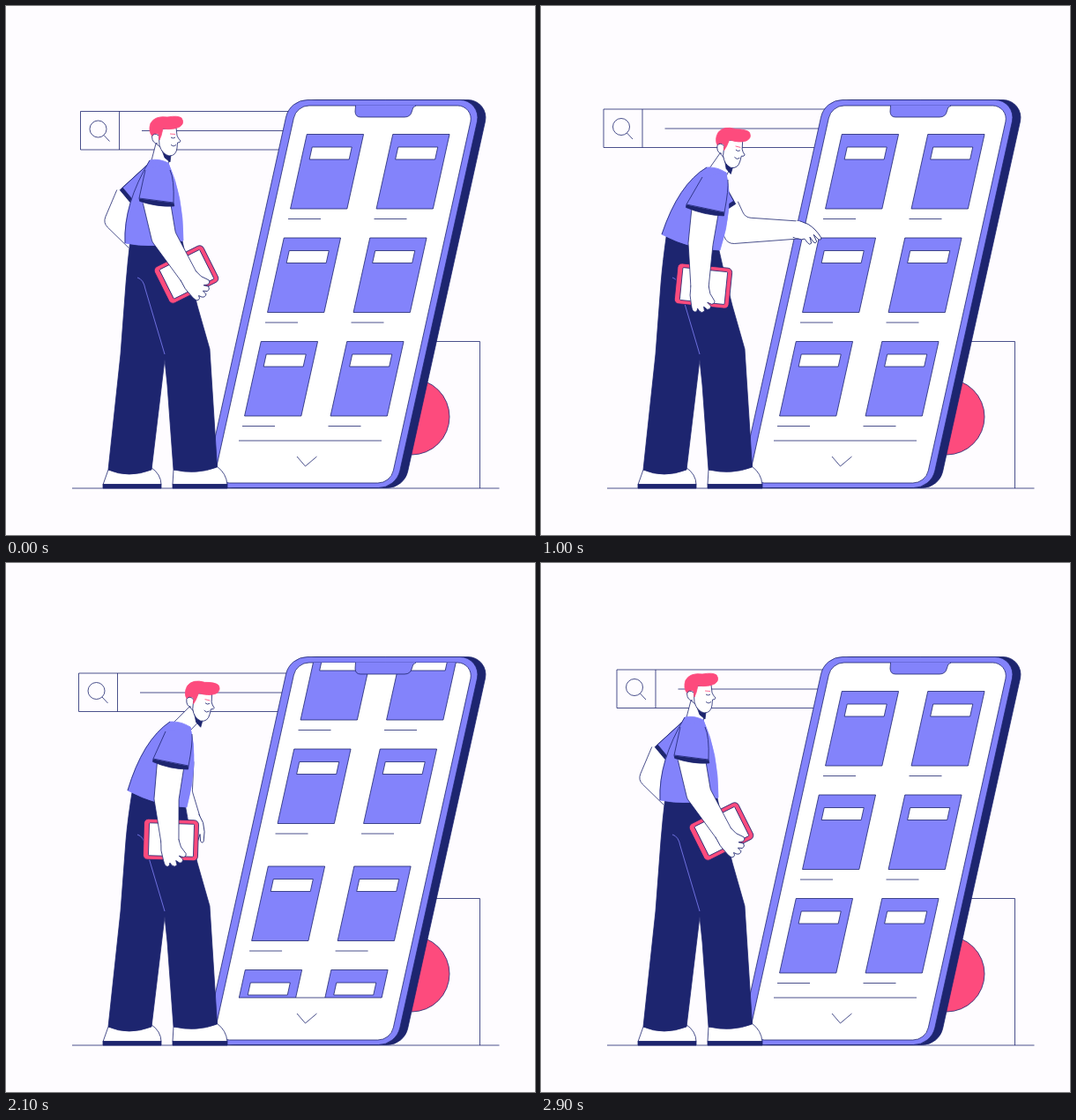
An HTML page with a canvas for the animation above (3 s loop, 600x600 px).

```html
<!DOCTYPE html>
<html lang="en">
<head>
<meta charset="utf-8">
<title>Scrolling a phone</title>
<style>
html, body { margin: 0; width: 100%; height: 100%; overflow: hidden; background: #fefcff; }
canvas { display: block; width: 600px; height: 600px; }
</style>
</head>
<body>
<canvas id="stage"></canvas>
<script>
const NAVY = '#1d256f', PURPLE = '#8383fb', PINK = '#fd4b7d', WHITE = '#fff', BACK = '#fefcff';
const LOOP = 3000, STEP = 100, SLOPE = 0.2213;
const SET_HEIGHT = 368, ROW_HEIGHT = 117.5;
const canvas = document.getElementById('stage');
const ctx = canvas.getContext('2d');
const ratio = window.devicePixelRatio || 1;
canvas.width = canvas.height = 600 * ratio;

// Poses: points as [x, y]; head and tablet also carry an angle.
const stand = {
  head: [169, 150, 0], neckBack: [163, 175], neckFront: [184, 178],
  chest: [201, 215], hemFront: [201, 266], spine: [133, 225], hemBack: [135, 269],
  cuffBack: [151, 218], cuffFront: [190, 223], elbow: [179, 262], wrist: [208, 308],
  tablet: [204.5, 304.5, -0.464],
  farCuff: [138, 213], farElbow: [127, 243], farWrist: [149, 270], farHand: [0.6]
};
const lean = {
  head: [203, 160, 0.17], neckBack: [186, 183], neckFront: [208, 189],
  chest: [213, 225], hemFront: [203, 278], spine: [156, 204], hemBack: [137, 261],
  cuffBack: [162, 226], cuffFront: [205, 234], elbow: [181, 270], wrist: [182, 319],
  tablet: [186, 316.5, 0],
  farCuff: [158, 211], farElbow: [140, 238], farWrist: [151, 262], farHand: [0.6]
};
const reach = {
  head: [203, 161, 0.17], neckBack: [188, 183], neckFront: [210, 189],
  chest: [219, 228], hemFront: [203, 277], spine: [156, 202], hemBack: [137, 259],
  cuffBack: [165, 225], cuffFront: [208, 234], elbow: [181, 270], wrist: [180, 320],
  tablet: [184, 317.5, 0.1],
  farCuff: [211, 226], farElbow: [221, 255], farWrist: [292, 254], farHand: [0.36]
};
const swipe = {
  head: [228, 169, 0.2], neckBack: [205, 185], neckFront: [228, 194],
  chest: [227, 242], hemFront: [206, 272], spine: [165, 193], hemBack: [140, 247],
  cuffBack: [176, 221], cuffFront: [215, 237], elbow: [182, 265], wrist: [171, 320],
  tablet: [173.5, 316, 0.28],
  farCuff: [221, 233], farElbow: [225, 264], farWrist: [281, 295], farHand: [0.08]
};
const rest = {
  head: [208, 157, 0.15], neckBack: [186, 180], neckFront: [209, 186],
  chest: [219, 225], hemFront: [205, 277], spine: [155, 201], hemBack: [138, 258],
  cuffBack: [167, 222], cuffFront: [207, 230], elbow: [182, 268], wrist: [186, 317],
  tablet: [187, 314, 0.03],
  farCuff: [200, 224], farElbow: [196, 262], farWrist: [211, 292], farHand: [1.1]
};
const mix = (a, b, u) => a + (b - a) * u;
const blend = (a, b, u) => Object.fromEntries(
  Object.keys(a).map(k => [k, a[k].map((v, i) => mix(v, b[k][i], u))]));

const poseKeys = [[0, stand], [400, lean], [1000, reach], [1200, reach], [1800, swipe],
  [2100, rest], [2500, blend(stand, rest, 0.09)], [2700, stand], [3000, stand]];
const scrollKeys = [[0, 0], [1200, 0], [1800, 72.5], [2100, 198.5], [2500, 331.5],
  [2800, SET_HEIGHT], [3000, SET_HEIGHT]];
const barKeys = [[-500, 87.5, 124.5], [-100, 86, 121], [0, 84.5, 119.5], [400, 77.5, 114.5],
  [1000, 71, 117], [1800, 77.5, 123.5], [2100, 82.5, 125], [2500, 87.5, 124.5],
  [2900, 86, 121], [3000, 84.5, 119.5], [3400, 77.5, 114.5]];

// Monotone cubic through the keys: smooth, with no overshoot.
function spline(keys, pick, t) {
  let i = 0;
  while (i < keys.length - 2 && t >= keys[i + 1][0]) i++;
  const slope = n => (pick(keys[n + 1]) - pick(keys[n])) / (keys[n + 1][0] - keys[n][0]);
  const tangent = n => {
    if (n === 0 || n === keys.length - 1) return 0;
    const a = slope(n - 1), b = slope(n);
    return a * b > 0 ? 2 * a * b / (a + b) : 0;
  };
  const h = keys[i + 1][0] - keys[i][0], u = (t - keys[i][0]) / h, s = u * u * (3 - 2 * u);
  return mix(pick(keys[i]), pick(keys[i + 1]), s)
    + h * u * (1 - u) * ((1 - u) * tangent(i) - u * tangent(i + 1));
}

function poseAt(t) {
  const pose = {};
  for (const part in stand) pose[part] = stand[part].map((_, i) => spline(poseKeys, k => k[1][part][i], t));
  return pose;
}

function paint(fill, stroke = NAVY, path) {
  if (fill) { ctx.fillStyle = fill; path ? ctx.fill(path) : ctx.fill(); }
  if (stroke) { ctx.strokeStyle = stroke; path ? ctx.stroke(path) : ctx.stroke(); }
}
const svg = (d, fill, stroke) => paint(fill, stroke, new Path2D(d));
function poly(points, fill, stroke, close = true) {
  ctx.beginPath();
  points.forEach(p => ctx.lineTo(p[0], p[1]));
  if (close) ctx.closePath();
  paint(fill, stroke);
}
function local(x, y, angle, draw) {
  ctx.save();
  ctx.translate(x, y);
  ctx.rotate(angle);
  draw();
  ctx.restore();
}
const add = (p, d, s = 1) => [p[0] + d[0] * s, p[1] + d[1] * s];
const mid = (a, b) => [(a[0] + b[0]) / 2, (a[1] + b[1]) / 2];
const q = p => `${p[0]} ${p[1]} `;
function unit(a, b) {
  const x = b[0] - a[0], y = b[1] - a[1], len = Math.hypot(x, y) || 1;
  return [x / len, y / len];
}
const angleOf = (a, b) => Math.atan2(b[1] - a[1], b[0] - a[0]);

// Slanted coordinates of the phone: x is measured along its top edge.
const slant = (x, y) => x - SLOPE * (y - 106);

function slab(left, right, top, bottom, wide, tight) {
  const corners = [[right, top, tight], [right, bottom, wide], [left, bottom, tight], [left, top, wide]];
  ctx.beginPath();
  ctx.moveTo(slant((left + right) / 2, top), top);
  corners.forEach(([x, y, r], i) => {
    const [nx, ny] = corners[(i + 1) % 4];
    ctx.arcTo(slant(x, y), y, slant(nx, ny), ny, r);
  });
  ctx.closePath();
}
function tile(x, y, w, h, fill) {
  const a = slant(x, y), b = slant(x, y + h);
  poly([[a, y], [a + w, y], [b + w, y + h], [b, y + h]], fill);
}

function drawBar(t) {
  const x = spline(barKeys, k => k[1], t), y = spline(barKeys, k => k[2], t);
  local(x, y, 0, () => {
    svg('M0 0H260V43.5H0ZM44 0V43.5M69.5 22H260');
    svg('M29.5 20a9.5 9.5 0 1 1 -19 0a9.5 9.5 0 1 1 19 0M26.5 27L33 34');
  });
}

function drawCard(x, y) {
  tile(x, y, 64.3, 84.5, PURPLE);
  tile(x + 9.2, y + 14.5, 45, 14, WHITE);
  const caption = slant(x, y + 96);
  poly([[caption, y + 96], [caption + 37, y + 96]], null, NAVY, false);
}

function drawPhone(scroll) {
  svg('M470 380.5H537.5V547');
  ctx.beginPath();
  ctx.arc(460, 466, 43, 0, Math.PI * 2);
  paint(PINK);
  slab(333, 549, 106.5, 546.5, 24, 20);
  paint(NAVY);
  slab(322, 540, 106.5, 546.5, 25, 20);
  paint(PURPLE);
  slab(331, 532.5, 113, 541, 18, 15);
  paint(WHITE);

  ctx.save();
  ctx.clip();
  ctx.beginPath();
  ctx.rect(200, 113, 400, 380);
  ctx.clip();
  for (const top of [scroll - SET_HEIGHT, scroll]) {
    for (let row = 0; row < 3; row++) {
      for (const x of [350, 447.5]) drawCard(x, 145.5 + top + row * ROW_HEIGHT);
    }
  }
  ctx.restore();

  svg('M396.5 113L396 120Q396.5 126 402 126H452Q459 126 460.5 119Q461 114 465 113', PURPLE);
  svg('M397 113H464', null, PURPLE);
  svg('M264 493H426M330 511L339.5 522L352.5 511');
}

function limb(a, b, c, widths, fill) {
  const d1 = unit(a, b), d2 = unit(b, c);
  const n1 = [-d1[1], d1[0]], n2 = [-d2[1], d2[0]];
  const miter = 1 / Math.max(0.5, 1 + n1[0] * n2[0] + n1[1] * n2[1]);
  const side = s => [add(a, n1, s * widths[0] / 2),
    add(b, [n1[0] + n2[0], n1[1] + n2[1]], s * miter * widths[1] / 2), add(c, n2, s * widths[2] / 2)];
  const left = side(1), right = side(-1).reverse();
  ctx.beginPath();
  ctx.moveTo(...left[0]);
  ctx.arcTo(...left[1], ...left[2], 11);
  ctx.lineTo(...left[2]);
  ctx.lineTo(...right[0]);
  ctx.arcTo(...right[1], ...right[2], 11);
  ctx.lineTo(...right[2]);
  paint(fill);
}

const OPEN_HAND = 'M-3 -10L8 -10Q18 -8 27 -1q2 3 -2 3L18 -1L24 5q0 3 -3 2L15 3L19 9q-1 3 -4 1L10 7L7 9L-3 10';
const GRIP_HAND = 'M-3 10Q8 12 20 9Q27 8 27 5q0 -3 -4 -3L26 0q3 -3 0 -6L21 -5L24 -9q0 -4 -4 -4L16 -9L18 -14q-1 -4 -4 -3L6 -12L-3 -10';
function hand(at, angle, shape) {
  local(at[0], at[1], angle, () => {
    svg(shape, WHITE);
    ctx.fillStyle = WHITE;
    ctx.fillRect(-6, -9.3, 8, 18.6);
  });
}

function drawLegs(p) {
  svg('M116 526L110 543H176Q176 531 164 523Z', WHITE);
  svg('M190 526L189 543H251Q250 530 239 522Z', WHITE);
  svg('M110 542.5H176V547H110ZM189 542.5H251V547H189Z', NAVY);
  const [bx, by] = p.hemBack, [fx, fy] = p.hemFront;
  svg(`M${bx + 6} ${by - 4}Q138 290 136 315L130 395L116 526Q139 536 165 526L180 401
    L183 430L190 526Q216 532 239.5 523L231 389L217 340Q208 305 ${fx - 2} ${fy - 4}Z`, NAVY);
  svg('M149 308Q156 310 158 321L180 395', null, PURPLE);
}

function drawHead(p) {
  const [x, y, turn] = p.head, cos = Math.cos(turn), sin = Math.sin(turn);
  const at = (u, v) => [x + u * cos - v * sin, y + u * sin + v * cos];
  poly([add(p.neckBack, [1, 4]), at(1, 6), at(16, 18), add(p.neckFront, [0, 4])], WHITE, NAVY, false);
  poly([at(7, 11), at(18, 19), at(17, 27), at(11, 22)], NAVY);
  local(x, y, turn, () => {
    svg('M4 -10L24 -12L25 -3Q26 0 29 3Q29 5 25.5 5L25 11Q24 20 16 20Q8 18 5 8Z', WHITE);
    svg('M7 -3L9 -11Q20 -9 28 -13Q34 -17 30 -23Q26 -26 14 -24Q0 -26 -5 -17Q-8 -8 -3 -2Q-1 -6 4 -5L5 2Z', PINK, PINK);
    svg('M4 -3Q-1 -7 -3.5 -2Q-3 6 3 6', WHITE);
    svg('M17 -5L23 -4.5', null, PINK);
    svg('M18 -1q2.5 2 5 0M18 7.5q3 3 6 0');
  });
}

function drawTorso(p) {
  const low = add(mid(p.hemBack, p.hemFront), [0, 8]);
  svg(`M${q(p.neckBack)}Q${q(p.spine)}${q(p.hemBack)}Q${q(low)}${q(p.hemFront)}`
    + `Q${q(p.chest)}${q(p.neckFront)}Q${q(add(mid(p.neckBack, p.neckFront), [0, -4]))}${q(p.neckBack)}`, PURPLE, PURPLE);
  svg(`M${q(p.neckBack)}Q${q(p.spine)}${q(p.hemBack)}`);
}

function drawFarArm(p) {
  limb(p.farCuff, p.farElbow, p.farWrist, [26, 30, 20], WHITE);
  hand(p.farWrist, p.farHand[0], OPEN_HAND);
  const shoulder = add(mid(p.neckBack, p.neckFront), [-6, 12]);
  const tip = add(p.farCuff, unit(shoulder, p.farCuff), 4);
  const sleeve = (end, fill) => limb(shoulder, mid(shoulder, end), end, [22, 20, 18], fill);
  sleeve(tip, NAVY);
  sleeve(p.farCuff, PURPLE);
}

function drawTablet([x, y, turn]) {
  local(x, y, turn, () => {
    ctx.beginPath();
    ctx.roundRect(-31, -23, 62, 46, 5);
    paint(PINK);
    ctx.beginPath();
    ctx.roundRect(-25, -18.5, 51, 37, 1);
    paint(WHITE);
  });
}

function drawNearArm(p) {
  const shoulder = mid(p.cuffBack, p.cuffFront), d = unit(shoulder, p.elbow);
  limb(shoulder, p.elbow, p.wrist, [31, 28, 20], WHITE);
  hand(p.wrist, angleOf(p.elbow, p.wrist), GRIP_HAND);
  svg(`M${q(p.cuffBack)}L${q(add(p.cuffBack, d, 3.5))}Q${q(add(shoulder, d, 8))}${q(add(p.cuffFront, d, 4))}L${q(p.cuffFront)}Z`, NAVY);
  const top = add(p.neckBack, [-5, 11]);
  const bulge = add(mid(p.neckFront, p.cuffFront), [4, -4]);
  const sleeve = `M${q(top)}L${q(p.cuffBack)}L${q(p.cuffFront)}Q${q(bulge)}`;
  svg(sleeve + q(p.neckFront) + 'Z', PURPLE, PURPLE);
  svg(sleeve + q(add(p.neckFront, [2, 8])));
}

function draw(t) {
  ctx.setTransform(ratio, 0, 0, ratio, 0, 0);
  ctx.fillStyle = BACK;
  ctx.fillRect(0, 0, 600, 600);
  ctx.lineWidth = 0.8;
  ctx.lineJoin = 'round';
  drawBar(t);
  drawPhone(spline(scrollKeys, k => k[1], t) % SET_HEIGHT);
  svg('M75 547H559.5');
  const pose = poseAt(t);
  drawFarArm(pose);
  drawLegs(pose);
  drawHead(pose);
  drawTorso(pose);
  drawTablet(pose.tablet);
  drawNearArm(pose);
}

function frame() {
  draw(Math.floor(performance.now() % LOOP / STEP) * STEP);
  requestAnimationFrame(frame);
}
frame();
</script>
</body>
</html>
```
